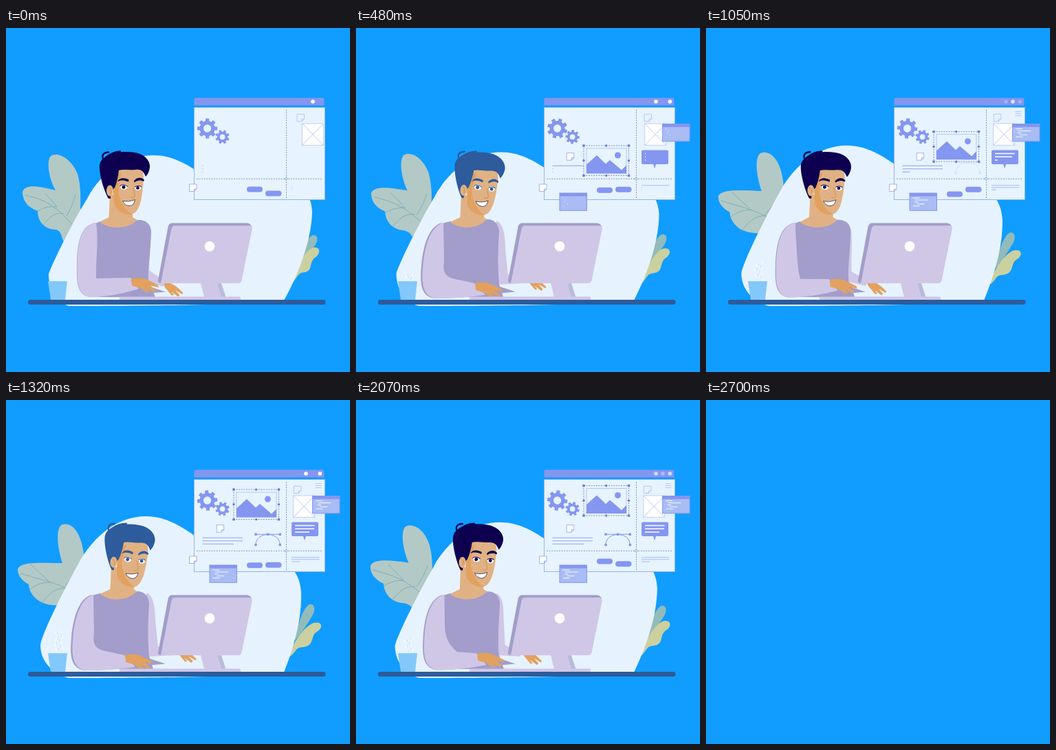
Animation of 500x500 px, one loop 2.73 s. Source, as an HTML page:

```html
<!DOCTYPE html>
<html lang="en">
<head>
<meta charset="utf-8">
<title>Designer at work</title>
<style>
html, body { margin: 0; width: 100%; height: 100%; overflow: hidden; background: #109dff; }
svg { display: block; width: 100vw; height: 100vh; }
.line { fill: none; stroke: #8496f0; stroke-width: 1; }
.thin { fill: none; stroke: #a9bcf4; stroke-width: .8; }
.dash { fill: none; stroke: #8496c8; stroke-width: 1; stroke-dasharray: 2 1.6; }
.main { fill: #8496f0; }
.note { fill: #fff; stroke: #8f9fe8; stroke-width: .8; }
.light { fill: #d0c7e7; }
.dark { fill: #a29dca; }
.skin { fill: #e0b184; }
.tan { fill: #e2a15f; }
.vein { fill: none; stroke: #6fa9b5; stroke-width: .8; }
</style>
</head>
<body>
<svg viewBox="0 0 500 500">
<defs>
  <path id="memo" d="M0 0H10.5V7L7 10.5H0Z M10.5 7H7V10.5"/>
</defs>
<g id="scene">
  <path id="leaf" fill="#b3c9c6"/>
  <path id="veins" class="vein"/>
  <path id="sprig" fill="#93bbba"/>
  <path id="sprig2" fill="#cbd09f"/>
  <path id="blob" fill="#e6f3ff"/>

  <path d="M61 368H89L86 395H65Z" fill="#83c8fa"/>
  <path id="steam" fill="none" stroke="#fff" stroke-width="1"/>
  <path id="steam2" fill="none" stroke="#c9d4ee" stroke-width=".8"/>

  <path d="M273.5 112.5V104Q273.5 101.5 276 101.5H460Q462.3 101.5 462.3 104V112.5Z" class="main"/>
  <rect x="273.5" y="115.5" width="190" height="134" fill="#e7f3ff" stroke="#8fb4f4"/>
  <g id="dots" fill="#fff">
    <circle cx="436" cy="107" r="2.8"/><circle cx="446" cy="107" r="2.8"/><circle cx="456.3" cy="107" r="2.8"/>
  </g>
  <path class="dash" d="M407.5 119V247M277 219.3H460"/>
  <circle cx="407.3" cy="219.3" r="1.7" fill="#e7f3ff" stroke="#8496c8" stroke-width=".8"/>
  <path id="gearA" class="main" fill-rule="evenodd"/>
  <path id="gearB" class="main" fill-rule="evenodd"/>
  <use href="#memo" x="266.5" y="227" class="note"/>
  <use href="#memo" id="memoA" x="306.2" y="181.7" class="note"/>
  <use href="#memo" id="memoB" y="125.2" class="thin"/>
  <g id="frame">
    <rect x=".5" y="0" width="31" height="31.3" fill="#fff" stroke="#b9c6ee" stroke-width=".8"/>
    <path class="thin" d="M.5 0L31.5 31.3M31.5 0L.5 31.3"/>
  </g>
  <rect id="btnA" x="350" width="23" height="8" rx="4" class="main"/>
  <rect id="btnB" x="377" width="23.5" height="8" rx="4" class="main"/>
  <path id="menu" class="thin" d="M449.5 121.5H458.5M449.5 124.5H458.5M449.5 127.5H458.5"/>
  <g id="curve">
    <path class="line" d="M363 195.2H398.3M363 210.5C363 190.5 398.3 190.5 398.3 210.5"/>
    <path class="main" d="M361.4 193.6h3.4v3.4h-3.4zM379 193.6h3.4v3.4h-3.4zM396.6 193.6h3.4v3.4h-3.4z"/>
    <circle cx="363" cy="210.5" r="1.9" class="main"/><circle cx="398.3" cy="210.5" r="1.9" class="main"/>
  </g>
  <g id="chat" class="main">
    <path d="M417 177.5H452Q454 177.5 454 179.5V196Q454 198 452 198H436L434 204.3L432 198H417Q415 198 415 196V179.5Q415 177.5 417 177.5Z"/>
  </g>
  <g id="codeA"></g>
  <g id="codeB"></g>
  <g id="words"></g>
  <g id="picture">
    <rect x="331" y="124.5" width="65.5" height="43.5" fill="#e7f3ff" stroke="#7f8fd0" stroke-dasharray="2 1.6"/>
    <rect x="335" y="128.5" width="58" height="36" class="thin"/>
    <path class="main" d="M335 152L350 138.5L363 151L369 145.5L386 160L393 153V165H335Z"/>
    <circle cx="380.5" cy="138.5" r="4.5" class="main"/>
    <g id="grips" fill="#6c7bd4"></g>
  </g>

  <path id="armR" class="light"/>
  <path class="dark" d="M200 373L232 383.5L203 386Z"/>
  <path id="handR" class="tan" d="M229 372L236 370C243 372 250 377 257.5 385L256 387L246 381L252.5 388.5L250 390.5L240 383L244 388L241 389L231 377Z"/>
  <path id="shade" class="dark"/>
  <path id="torso" class="dark"/>
  <path id="neck" class="skin"/>
  <path id="sleeve" class="light"/>
  <path id="handL" class="tan" d="M182 364.5C192 362 201 363 208 367L221 373.5L222 377L210 374.5L218 381.5L215 384L204 377.5L209 383L205 384.5L195 378L183 374.5Z"/>

  <g id="head">
    <path class="skin" d="M154 225C157 240 156 256 163 264C170 271 180 274 188 268C196 261 199 240 200 216L198 204L165 204Z"/>
    <path class="tan" d="M161 212C156 230 155 246 158 258C163 268 175 273 184 270.5C174 266 167 255 164 243C162 234 165 220 168 211Z"/>
    <path class="hair" d="M149 248C143 238 135 213 136 199C137 194 140 190 144 188C158 178 181 179 192 182C205 186 210 196 209 203C208 209 206 213 203 216C200 208 196 205 188 206C178 207 170 205 164 207C163 216 161 225 158 232L152 238L152 248Z"/>
    <path class="lock" fill="none" stroke-width="2.4" stroke-linecap="round" d="M143 193C138 187 140 181 149 180.5M144 189C150 184 157 180 166 179.5"/>
    <ellipse cx="151" cy="236.5" rx="5" ry="8" class="skin"/>
    <path d="M149 232Q154 234 152 241" fill="none" stroke="#d08d4e"/>
    <path class="hair" d="M162 223C165 217 172 217 178.5 220.5L178 223.5C171 220.5 167 221 162 223ZM186 222C190 217 197 216 201 221L200 223C196 220.5 191 221 186.5 224.5Z"/>
    <ellipse cx="171.5" cy="231" rx="5.2" ry="3.9" fill="#fff"/>
    <ellipse cx="191.8" cy="232.3" rx="4.6" ry="3.7" fill="#fff"/>
    <circle cx="171" cy="231.2" r="2.5" class="hair"/><circle cx="191.5" cy="232.4" r="2.4" class="hair"/>
    <path class="lock" fill="none" stroke-width="1" d="M165.5 229.5Q171 225.5 177 230.5M187 231Q192 227.5 197 231"/>
    <path d="M184.5 232L187.5 244Q186 247.5 181 246" fill="none" stroke="#d59550" stroke-width="1.1"/>
    <path d="M169.5 251.5Q179 253.5 187.5 249.5Q186.5 258.5 179 258.5Q172.5 258 169.5 251.5Z" fill="#fff" stroke="#4a4252" stroke-width=".9"/>
  </g>

  <path class="dark" d="M221 367L235.5 289Q236.5 284 241 283.5H350Q356 284 357 289L245 300L228 371Q220 371 221 367Z"/>
  <path class="light" d="M225 371L240.5 292Q241.5 287.5 246 287.3H354Q358.5 287.5 357.8 292L342.5 367Q341.5 371 337.5 371Z"/>
  <circle cx="296" cy="317.3" r="7.4" fill="#fff"/>
  <path class="light" d="M283 371H307L313 391H288Z"/>
  <path class="dark" d="M307 371H313L319.5 391H313Z" opacity=".65"/>
  <path class="light" d="M167 390.5H340Q341.5 392 341 395H165Q164 392 167 390.5Z"/>
  <rect x="32" y="395" width="432.5" height="7" rx="3.2" fill="#2d5b9b"/>
</g>
</svg>
<script>
const LOOP = 2730, STEP = 30, BLANK = 2700;
const $ = id => document.getElementById(id);
const mix = (a, b, k) => a + (b - a) * k;
const part = (t, a, b) => Math.min(1, Math.max(0, (t - a) / (b - a)));
const ease = (t, a, b) => (1 - Math.cos(Math.PI * part(t, a, b))) / 2;
const wave = (t, period) => (1 - Math.cos(2 * Math.PI * t / period)) / 2;
const set = (id, name, v) => $(id).setAttribute(name, v);
const fade = (id, t, a, b) => set(id, 'opacity', ease(t, a, b));

// blends two paths that share the same commands
function morph(a, b, k) {
  const ends = b.match(/-?[\d.]+/g);
  let i = 0;
  return a.replace(/-?[\d.]+/g, n => mix(+n, +ends[i++], k).toFixed(2));
}

// swayed by the slow wave
const sway = {
  blob: ['M62 358C66 345 95 285 118 248C140 205 180 185 214 185C240 185 260 196 282 211C310 225 443 190 445 267C444 310 424 360 404 396C380 402 200 404 92 404C80 402 62 385 62 358Z',
         'M50 356C54 335 85 275 104 240C128 195 165 169 203 169C232 169 256 184 278 200C310 220 426 202 429 280C430 320 418 360 404 396C380 402 200 404 92 404C80 402 50 388 50 356Z'],
  leaf: ['M84 312C80 300 80 296 73 293C55 293 46 280 46 266C30 260 24 250 24 238C28 226 48 230 72 236C63 220 58 194 65 186C76 179 95 190 104 212C108 225 109 245 108 262L120 300Z',
         'M86 298C80 298 74 299 66 298C48 296 34 284 33 268C22 262 17 254 17 246C20 234 55 237 82 237C75 215 72 190 80 182C90 177 103 184 109 205C113 218 114 230 114 240L120 290Z'],
  veins: ['M28 243C50 248 70 254 98 288M56 240C64 248 68 252 74 260M46 266C56 260 66 259 74 260M101 242C97 255 94 264 88 273M55 286C64 272 74 268 84 270',
          'M21 252C45 260 68 264 94 276M35 238C45 248 52 254 62 263M34 276C44 268 52 265 66 265M108 238C102 252 96 260 86 270M50 297C60 286 68 273 88 273'],
  sprig: ['M425 344C430 325 436 305 446 301C454 300 454 309 449 316C442 326 434 338 425 348Z',
          'M420 344C425 325 432 302 441 297C449 295 450 305 446 312C440 322 432 336 420 350Z'],
  sprig2: ['M414 374C422 352 432 324 447 319C458 318 457 328 450 333C444 337 444 342 442 349C439 357 431 354 427 357C423 360 420 367 414 374Z',
           'M410 374C418 352 432 330 447 324C460 321 461 331 453 336C446 340 447 344 444 351C440 361 430 358 424 361C420 364 417 372 410 374Z']
};

// follows the lean of the body
const body = {
  armR: ['M204 283C210 286 211 296 210 310L208 352C216 358 226 364 232 370L228 376L205 367Z',
         'M204 280C214 284 217 300 217 320L221 358C226 360 238 364 246 366L244 371L206 373Z'],
  torso: ['M130 284L137 281C150 290 178 290 191 279C203 278 211 285 211 296C210 330 206 350 207 366L217 391L135 391L131 364Z',
          'M125 284L137 281C150 289 178 289 190 278C200 278 207 283 208 296C206 325 206 350 208 372L214 391L118 391L124 363Z'],
  neck: ['M151 240L149.500 275L136 282C150 293 178 293 191 279L184 275L184 255Z',
         'M153 240L151.500 275L137 282C150 293 178 293 190 278L186 275L187 255Z'],
  sleeve: ['M131 283C112 286 104 305 103.500 345C103 370 104 388 122 391C145 391 168 387 193 379L181 363L131 364C130 340 135 310 131 283Z',
           'M127 283C108 288 99 318 97 350C95 375 98 391 118 393C140 393 165 391 188 388L172 371C155 367 138 364 124 363C128 340 133 305 127 283Z']
};

function gear(cx, cy, r, turn) {
  const pt = (rad, a) => `${(cx + rad * Math.cos(a)).toFixed(2)} ${(cy + rad * Math.sin(a)).toFixed(2)}`;
  const pts = [];
  for (let i = 0; i < 8; i++) {
    const a = turn + i * Math.PI / 4;
    pts.push(pt(r * .75, a - .24), pt(r, a - .17), pt(r, a + .17), pt(r * .75, a + .24));
  }
  const h = r * .38;
  return `M${pts.join('L')}ZM${cx - h} ${cy}a${h} ${h} 0 1 0 ${2 * h} 0a${h} ${h} 0 1 0 ${-2 * h} 0Z`;
}

function wisps(top, t, xs) {
  let d = '';
  for (const x of xs) {
    for (let y = 366; y > top; y--) {
      if ((y + t / 60 + x * 3) % 8 < 4.5) {
        const at = v => `${(x + 1.3 * Math.sin(v / 3)).toFixed(2)} ${v}`;
        d += `M${at(y)}L${at(y - 1)}`;
      }
    }
  }
  return d;
}

// typed lines: x, y, width, start, end
const typed = [];
function write(parent, color, rows) {
  for (const [x, y, w, a, b] of rows) {
    const e = document.createElementNS('http://www.w3.org/2000/svg', 'line');
    const attrs = { x1: x, y1: y, y2: y, stroke: color, 'stroke-width': parent === 'chat' ? 1.5 : 1.1 };
    for (const k in attrs) e.setAttribute(k, attrs[k]);
    $(parent).appendChild(e);
    typed.push({ e, x, w, a, b });
  }
}

function build() {
  write('words', '#8fa2ec', [[285.5, 200.3, 58.5, 0, 500], [285.5, 204.8, 58.5, 500, 980], [285.5, 209.2, 45.5, 980, 1270]]);
  write('words', '#a9bcf4', [[415, 228.7, 40.5, 0, 480], [415, 231.8, 40.5, 500, 980], [415, 235, 12, 980, 1100]]);
  write('chat', '#fff', [[420, 182.5, 28.5, 480, 760], [420, 187.2, 28, 720, 1090], [420, 192, 21, 1000, 1270]]);
  const rows = [[4.500, 7, 10], [8, 10, 19], [7, 13, 5.5], [10.500, 15.700, 11], [5, 18.700, 10]];
  for (const [id, x, y, from] of [['codeA', 445.5, 139.5, 440], ['codeB', 296, 240, 500]]) {
    $(id).innerHTML = `<rect x="${x}" y="${y}" width="39.500" height="25.300" fill="#a9bcf4"/>` +
      `<rect x="${x}" y="${y}" width="39.500" height="4.500" class="main"/>` +
      `<rect x="${x}" y="${y}" width="39.500" height="25.300" class="line" stroke-width=".8"/>`;
    write(id, '#eef4ff', rows.map(([dx, dy, w], i) => [x + dx, y + dy, w, from + i * 20, from + 300 + i * 30]));
  }
  let grips = '';
  for (const x of [331, 363.7, 396.5]) for (const y of [124.5, 146.2, 168]) {
    const midX = x === 363.7, midY = y === 146.2;
    if (midX && midY) continue;
    grips += `<rect x="${x - 1.7}" y="${y - 1.7}" width="3.400" height="3.400" rx="${midX || midY ? 1.7 : 0}"/>`;
  }
  $('grips').innerHTML = grips;
}

function draw(t) {
  $('scene').style.display = t >= BLANK ? 'none' : '';
  const slow = wave(t, 2700), lean = wave(t, 900);
  for (const id in sway) set(id, 'd', morph(...sway[id], slow));
  for (const id in body) set(id, 'd', morph(...body[id], lean));
  set('shade', 'd', $('sleeve').getAttribute('d'));
  set('shade', 'transform', `translate(${-.6 - 1.8 * lean} 0)`);
  set('head', 'transform', `translate(${2.5 * lean} ${.8 * lean}) rotate(${3.5 * lean} 178 285)`);
  set('handL', 'transform', `translate(${-9 * lean} ${6.5 * lean})`);
  set('handR', 'transform', `translate(${19.5 * lean} ${-8.5 * lean})`);
  const hair = lean > .85 ? '#2d5b9b' : '#0d0050';
  document.querySelectorAll('.hair').forEach(e => e.setAttribute('fill', hair));
  document.querySelectorAll('.lock').forEach(e => e.setAttribute('stroke', hair));

  const turn = 2 * Math.PI * t / 2700;
  set('gearA', 'd', gear(292.6, 146, 14.8, turn));
  set('gearB', 'd', gear(314.6, 158.3, 10.3, -turn + .4));
  [...$('dots').children].forEach((e, i) => e.setAttribute('opacity', i === 1 ? 1 - lean : lean));

  const beat = t % 1800;
  set('btnA', 'y', 230.5 + 7 * (ease(beat, 340, 820) - ease(beat, 1200, 1650)));
  set('btnB', 'y', 236.5 - 5.7 * (ease(beat, 120, 470) - ease(beat, 1060, 1400)));

  const slide = ease(t, 0, 650);
  set('frame', 'transform', `translate(${mix(430, 417.2, slide)} 139)`);
  set('memoB', 'x', mix(423, 418.3, slide));
  set('picture', 'transform', `translate(0 ${mix(46.5, 0, ease(t, 656, 1513))})`);
  fade('picture', t, 120, 400);
  fade('memoA', t, 60, 320);
  fade('chat', t, 150, 420);
  fade('codeA', t, 180, 440);
  fade('codeB', t, 200, 470);
  fade('menu', t, 600, 900);
  fade('curve', t, 980, 1240);
  for (const { e, x, w, a, b } of typed) e.setAttribute('x2', x + Math.max(1, w * part(t, a, b)));

  const top = mix(366, 335, part(t, 0, 1250)) + 8 * part(t, 1700, 2070);
  set('steam', 'd', wisps(top, t, [72, 81]));
  set('steam2', 'd', wisps(top + 3, t, [75, 79]));
}

function tick() {
  draw(Math.floor(performance.now() % LOOP / STEP) * STEP);
  requestAnimationFrame(tick);
}

build();
tick();
</script>
</body>
</html>
```
